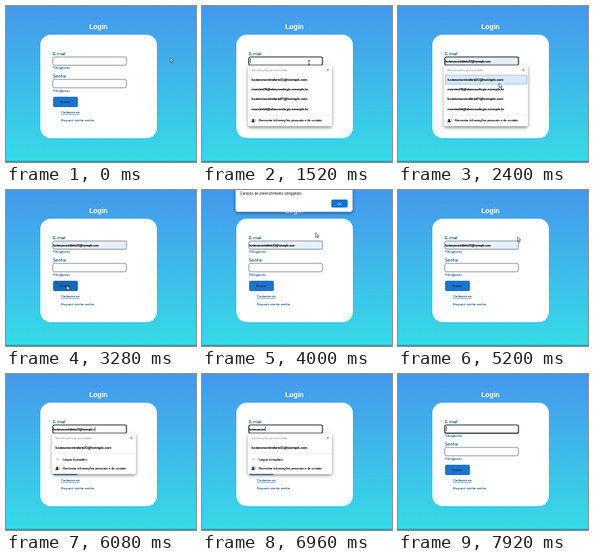
Write an HTML page that moves like this. It is 238 by 196 pixels and loops after 8000 ms.

```html
<!DOCTYPE html>
<html lang="pt-BR">
<head>
<meta charset="utf-8">
<title>Login</title>
<style>
html, body { margin: 0; width: 100%; height: 100%; overflow: hidden; background: #3fb8ea; }
svg { display: block; width: 100vw; height: 100vh; }
text { font-family: "Liberation Sans", Arial, sans-serif; fill: #16171a; white-space: pre; }
.title { font-weight: bold; font-size: 8.5px; fill: #fff; text-anchor: middle; }
.label, .note, .link { fill: #1c5f92; stroke: #1c5f92; stroke-width: .1px; }
.label { font-size: 5.7px; }
.note { font-size: 4.1px; }
.link { font-size: 4.3px; }
.item, .value { stroke: #0c0d0f; stroke-width: .22px; fill: #0c0d0f; }
.item { font-size: 4.2px; }
.value { font-size: 3.4px; }
.small { font-size: 3.95px; stroke: #16171a; stroke-width: .15px; }
.button { font-size: 4.4px; text-anchor: middle; }
.field { fill: #fff; stroke: #5b6068; stroke-width: .7; }
</style>
</head>
<body>
<svg viewBox="0 0 238 196" preserveAspectRatio="none">
  <defs>
    <linearGradient id="sky" x2="0" y2="1">
      <stop stop-color="#4598ec"/>
      <stop offset="1" stop-color="#36dbe6"/>
    </linearGradient>
    <filter id="shade" x="-20%" y="-20%" width="140%" height="160%">
      <feDropShadow dx="0" dy="1.7" stdDeviation="2.2" flood-color="#000" flood-opacity=".5"/>
    </filter>
  </defs>
  <rect width="238" height="196" fill="url(#sky)"/>
  <rect y="194.6" width="238" height="1.4" fill="#2793a8"/>
  <text class="title" x="115.7" y="29.2">Login</text>
  <rect x="43" y="36" width="146" height="130" rx="13" fill="#fff"/>

  <text class="label" x="58.5" y="62">E-mail</text>
  <rect id="email" class="field" x="58.7" y="64" width="92.2" height="10.4" rx="2"/>
  <text id="value" class="value" x="59.6" y="70.5"></text>
  <rect id="caret" y="66.5" width=".6" height="5.3" fill="#111"/>
  <text class="note" x="58.5" y="79.2">*Obrigatório</text>

  <text class="label" x="58.5" y="90.2">Senha</text>
  <rect class="field" x="58.7" y="92.2" width="92.2" height="10.6" rx="2"/>
  <text class="note" x="58.5" y="107.6">*Obrigatório</text>

  <rect id="enter" x="59" y="114" width="31" height="13" rx="2" fill="#1b74cb"/>
  <text class="button" x="74.2" y="122.1">Entrar</text>
  <text class="link" x="69" y="135" text-decoration="underline">Cadastre-se</text>
  <text class="link" x="69" y="144.8">Esqueci minha senha</text>

  <g id="popup"></g>

  <g id="alert">
    <rect x="42" y="-8" width="146.5" height="35.3" rx="3" fill="#fff" filter="url(#shade)"/>
    <text x="47.5" y="6" font-size="4.55">Campos de preenchimento obrigatório</text>
    <rect x="162" y="12" width="20.5" height="10" rx="1.6" fill="#0f74d2"/>
    <text class="button" x="172.3" y="18.5" style="fill:#fff;font-size:4px">OK</text>
  </g>

  <g id="cursor">
    <path id="arrow" d="M0 0V5.8L1.4 4.6 2.3 6.8 3.3 6.3 2.4 4.2H4.3Z" fill="#fff" stroke="#16181c" stroke-width=".55"/>
    <path id="beam" d="M-1.2-3Q0-3 0-2.2V2.2Q0 3-1.2 3M1.2-3Q0-3 0-2.2M0 2.2Q0 3 1.2 3" fill="none" stroke="#16181c" stroke-width=".7"/>
  </g>
</svg>
<script>
const LOOP = 8000;
const $ = id => document.getElementById(id);
const show = (el, on) => el.setAttribute('visibility', on ? 'visible' : 'hidden');
const within = (t, a, b) => t >= a && t < b;
const MAIL = 'lucianomoreirafaria31@exemplo.com';
const MAILS = [MAIL, 'moreira29@alunoscolegio.exemplo.br',
  'lucianomoreirafaria07@exemplo.com', 'moreira54@alunoscolegio.exemplo.br'];

// Pointer stops: time, x, y
const STOPS = [
  [0, 206, 65], [160, 206, 65], [880, 176, 67], [1280, 134, 71], [1680, 134, 71],
  [2160, 126.5, 97], [2640, 126.5, 97], [3040, 76, 120], [3360, 76, 120],
  [4000, 142.5, 53.7], [4320, 172, 17], [4560, 172, 17], [5120, 149.6, 58.7],
  [5220, 149.6, 58.7], [5480, 134, 70], [8000, 134, 70]
];

function pointer(t) {
  const i = Math.max(1, STOPS.findIndex(s => s[0] > t));
  const [t0, x0, y0] = STOPS[i - 1], [t1, x1, y1] = STOPS[i];
  const u = (t - t0) / (t1 - t0), e = u * u * (3 - 2 * u);
  return [x0 + (x1 - x0) * e, y0 + (y1 - y0) * e];
}

const line = (cls, x, y, s) => `<text class="${cls}" x="${x}" y="${y}">${s}</text>`;

function popupMarkup(mode) {
  const full = mode !== 'short';
  const foot = full ? 144 : 118.5;
  let out = `<rect x="57.7" y="74.6" width="105" height="${foot - 67.6}" rx="2.5" fill="#fff" filter="url(#shade)"/>`;
  out += '<text x="61.7" y="81.8" font-size="4.05" style="fill:#85888c">Informações preenchidas</text>';
  out += '<path d="M156 78.8l2.8 2.8m0-2.8l-2.8 2.8" stroke="#303338" stroke-width=".6"/>';
  if (mode === 'hover')
    out += '<rect x="59.4" y="86.9" width="102" height="11.2" fill="#d8e9fb" stroke="#7ba6d2" stroke-width=".6"/>';
  MAILS.slice(0, full ? 4 : 1).forEach((m, i) => out += line('item', 62.3, 93.8 + i * 12.3, m));
  out += `<path d="M57.9 ${full ? 137 : 99.5}h104.6" stroke="#dfe1e4" stroke-width=".6"/>`;
  if (!full) {
    out += '<path d="M63 105.6l3 3m0-3l-3 3" stroke="#777b80" stroke-width=".5"/>';
    out += line('small', 71, 108.6, 'Limpar formulário');
  }
  out += `<circle cx="64" cy="${foot - 1}" r="1.1"/><path d="M62.2 ${foot + 1.8}q0-1.8 1.8-1.8t1.8 1.8zm3.6-3.2h1.6m-1.6 1.5h1.6" stroke="#222" stroke-width=".5"/>`;
  return out + line('small', 71, foot + 1.2, 'Gerenciar informações pessoais e de contato');
}

let mode = null;
function setPopup(next) {
  if (next === mode) return;
  mode = next;
  $('popup').innerHTML = mode ? popupMarkup(mode) : '';
}

function textAt(t) {
  if (t < 2080) return '';
  if (t < 6000) return MAIL;
  return MAIL.slice(0, Math.max(0, MAIL.length - Math.ceil((t - 6000) / 46)));
}

function draw(t) {
  const focus = within(t, 1360, 3120) || t >= 5520;
  const filled = within(t, 2080, 6000);
  const email = $('email');
  email.style.fill = filled ? '#e7effc' : '#fff';
  email.style.stroke = focus ? '#111417' : '#5b6068';
  email.style.strokeWidth = focus ? 1.1 : .7;

  const s = textAt(t), value = $('value');
  if (value.textContent !== s) value.textContent = s;
  const typing = t >= 6000;
  show($('caret'), focus && (typing || !filled));
  $('caret').setAttribute('x', 60 + (s ? value.getComputedTextLength() : 0));

  setPopup(within(t, 1360, 2080) ? 'list' : within(t, 2080, 2640) ? 'hover' :
    within(t, 5600, 7560) ? 'short' : '');
  show($('alert'), within(t, 3360, 4560));
  $('enter').setAttribute('fill', within(t, 3040, 3360) ? '#1768b8' : '#1b74cb');

  const [x, y] = pointer(t);
  const overField = !within(t, 2080, 2640) && x > 58 && x < 151 && y > 64 && y < 75;
  $('cursor').setAttribute('transform', `translate(${x} ${y})`);
  show($('arrow'), !typing && !overField);
  show($('beam'), !typing && overField);
}

const start = performance.now();
function tick() {
  draw((performance.now() - start) % LOOP);
  requestAnimationFrame(tick);
}
tick();
</script>
</body>
</html>
```
